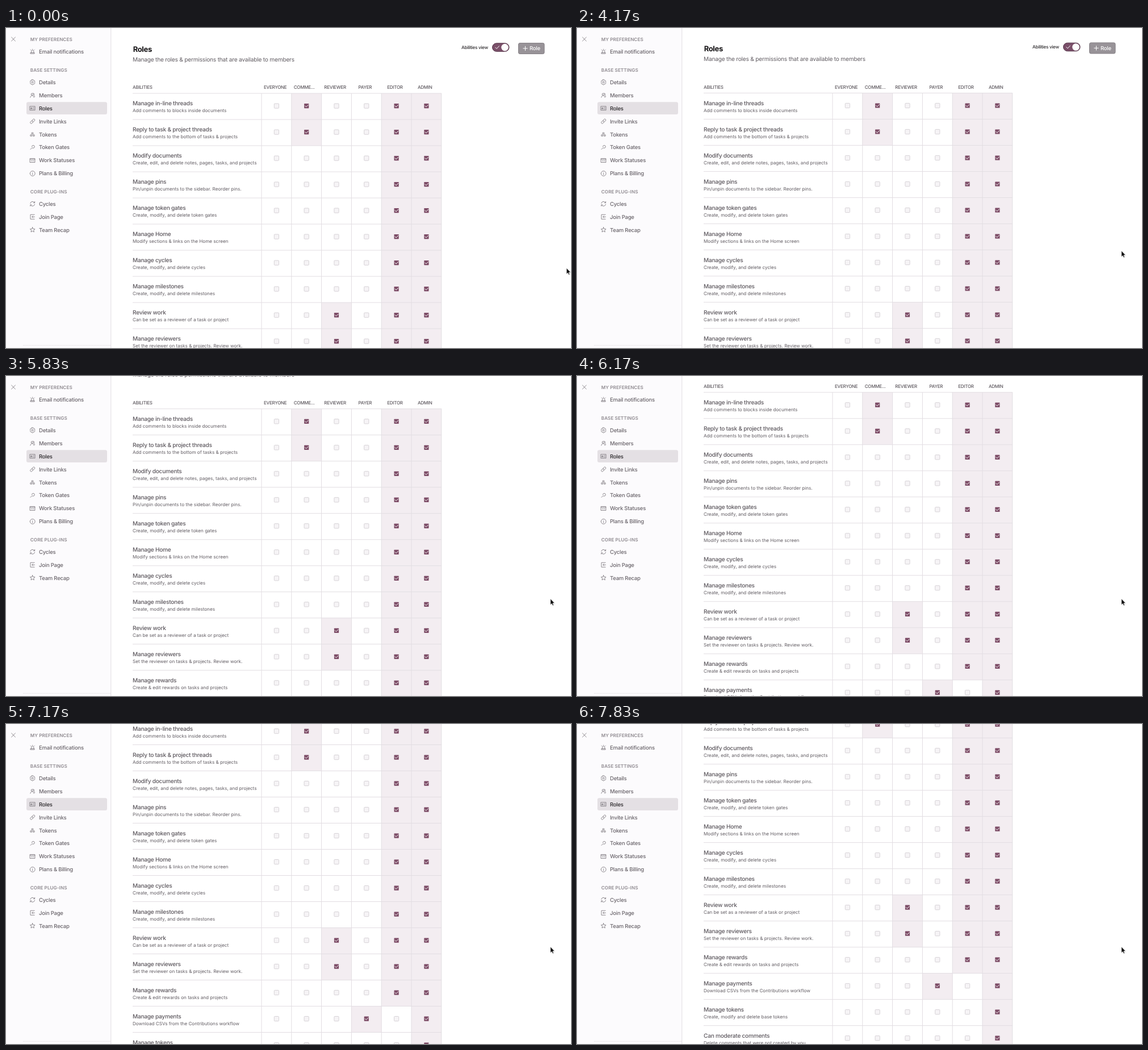
An HTML page for the animation above (8000 ms loop, 995x563 px).

```html
<!DOCTYPE html>
<html lang="en">
<head>
<meta charset="utf-8">
<title>Roles settings</title>
<style>
  html, body { margin: 0; width: 100%; height: 100%; overflow: hidden; background: #fff; }
  svg { display: block; width: 995px; height: 563px; }
  text { font-family: Inter, sans-serif; text-rendering: geometricPrecision; }
  .title { font-size: 13.1px; font-weight: 700; fill: #161416; letter-spacing: -.03em; }
  .intro { font-size: 10.15px; fill: #625d63; letter-spacing: -.02em; }
  .name { font-size: 10.1px; font-weight: 550; fill: #5d585e; letter-spacing: -.024em; }
  .note { font-size: 8.14px; fill: #625d63; }
  .col { font-size: 8px; font-weight: 550; fill: #5d585e; letter-spacing: -.034em; }
  .view { font-size: 8.05px; font-weight: 500; fill: #302d30; letter-spacing: -.034em; }
  .item { font-size: 9.5px; font-weight: 550; fill: #6a656b; letter-spacing: -.024em; }
  .active { fill: #2b282b; }
  .button { fill: #fff; }
  .group { font-size: 8.1px; font-weight: 600; fill: #8e898f; letter-spacing: .01em; }
  .mid { text-anchor: middle; }
  .line { stroke: #e2dde2; }
  .icon { fill: none; stroke: #7b767c; stroke-width: .85; stroke-linejoin: round; stroke-linecap: round; }
  .tick { fill: none; stroke: #fff; stroke-width: 1; stroke-linecap: round; stroke-linejoin: round; }
</style>
</head>
<body>
<svg viewBox="0 0 995 563">
  <g id="page"></g>
  <g id="sidebar"></g>
  <path id="cursor" d="M0 0V10.5L2.4 8.3 4 11.9 5.7 11.2 4.2 7.6H7.4z" fill="#111" stroke="#fff" stroke-width=".6"/>
</svg>
<script>
const get = id => document.getElementById(id);
const text = (x, y, cls, s) => `<text x="${x}" y="${y}" class="${cls}">${s}</text>`;
const rect = (x, y, w, h, r, fill, more = '') =>
  `<rect x="${x}" y="${y}" width="${w}" height="${h}" rx="${r}" fill="${fill}" ${more}/>`;
const line = (x1, y1, x2, y2) => `<path class="line" d="M${x1} ${y1}L${x2} ${y2}"/>`;

const columns = ['EVERYONE', 'COMME...\u00a0\u00a0', 'REVIEWER', 'PAYER', 'EDITOR', 'ADMIN'];
// Each ability: name, description, indexes of the roles that have it.
const abilities = [
  ['Manage in-line threads', 'Add comments to blocks inside documents', '145'],
  ['Reply to task & project threads', 'Add comments to the bottom of tasks & projects', '145'],
  ['Modify documents', 'Create, edit, and delete notes, pages, tasks, and projects', '45'],
  ['Manage pins', 'Pin/unpin documents to the sidebar. Reorder pins.', '45'],
  ['Manage token gates', 'Create, modify, and delete token gates', '45'],
  ['Manage Home', 'Modify sections & links on the Home screen', '45'],
  ['Manage cycles', 'Create, modify, and delete cycles', '45'],
  ['Manage milestones', 'Create, modify, and delete milestones', '45'],
  ['Review work', 'Can be set as a reviewer of a task or project', '245'],
  ['Manage reviewers', 'Set the reviewer on tasks & projects. Review work.', '245'],
  ['Manage rewards', 'Create & edit rewards on tasks and projects', '45'],
  ['Manage payments', 'Download CSVs from the Contributions workflow', '35'],
  ['Manage tokens', 'Create, modify and delete base tokens', '5'],
  ['Can moderate comments', 'Delete comments that were not created by you', '5'],
];
const LEFT = 450, TOP = 115, COL = 52.8, ROW = 46;

function checkbox(x, y, on) {
  return on
    ? rect(x - 4.1, y - 4, 8.2, 8.2, .6, '#7d4d67') + `<path class="tick" d="M${x - 2.6} ${y}l2 2 3.8-3.8"/>`
    : rect(x - 4.1, y - 4, 8.2, 8.2, 1, '#f6f4f6', 'stroke="#d3cfd3" stroke-width=".9"');
}

function buildPage() {
  let out = text(223.7, 42, 'title', 'Roles')
    + text(223, 58.6, 'intro', 'Manage the roles & permissions that are available to members')
    + text(802, 37, 'view', 'Abilities view')
    + rect(856.5, 26.8, 29.5, 14.5, 7.25, '#7a4f69', 'stroke="#57374b"')
    + '<circle cx="878.5" cy="34.1" r="6.3" fill="#fff"/><path class="tick" d="M861.8 34.2l2.3 2.3 4.3-4.8"/>'
    + rect(902.5, 26.5, 45.5, 19, 2.5, '#989398', 'stroke="#858085"')
    + '<path class="tick" d="M914.5 32.2v7.4M910.8 35.9h7.4"/>'
    + text(922, 39.4, 'item button', 'Role')
    + text(223, 107.4, 'col', 'ABILITIES');
  columns.forEach((name, i) => out += text(474.2 + i * 52.7, 107.4, 'col mid', name));
  let grid = line(223, TOP, 767, TOP);
  abilities.forEach(([name, note, roles], r) => {
    const y = TOP + r * ROW;
    out += text(223, y + 21.4, 'name', name) + text(223, y + 33.3, 'note', note);
    columns.forEach((_, c) => {
      const x = LEFT + c * COL, on = roles.includes(c);
      if (on) out += rect(x, y, COL, ROW, 0, '#f3edf1');
      grid += checkbox(x + COL / 2, y + 22, on);
    });
    grid += line(223, y + ROW, 767, y + ROW);
  });
  for (let c = 0; c <= 6; c++) grid += line(LEFT + c * COL, TOP, LEFT + c * COL, TOP + ROW * abilities.length);
  return out + grid;
}

const starPoints = Array.from({ length: 10 }, (_, i) => {
  const r = i % 2 ? 2.1 : 4.6, a = i * Math.PI / 5;
  return `${r * Math.sin(a)} ${-r * Math.cos(a)}`;
});
// Icons are drawn around their own centre.
const icons = {
  alarm: 'M-3.4 3.8H3.4V2.2H-3.4zM-2.2 2V-.3a2.2 2.2 0 0 1 4.4 0V2M0-4v-.2M-3.2-2.8l-.4-.4M3.2-2.8l.4-.4',
  gear: 'M-1-4.5H1L1.5-3.2 3-3.2 4.2-1.2 3.5 0 4.2 1.2 3 3.2 1.5 3.2 1 4.5H-1L-1.5 3.2-3 3.2-4.2 1.2-3.5 0-4.2-1.2-3-3.2-1.5-3.2zM-1.5 0a1.5 1.5 0 1 0 3 0a1.5 1.5 0 1 0-3 0',
  people: 'M-2.4-1.6a1.8 1.8 0 1 0 3.6 0a1.8 1.8 0 1 0-3.6 0M-3.8 3.9C-3.6 1.4-2.2.6-.6.6S2.2 1.6 2.4 3.9M1.4-3.5a1.8 1.8 0 0 1 .8 3.3Q3.7.8 3.8 2.8',
  card: 'M-4.4-3.4H4.4V3.4H-4.4zM-2.8 1.6V-.4a.9 .9 0 1 1 1.8 0V1.6M-2.8.5H-1M1-1.2H2.8M1 1.3H2.8',
  link: 'M-.8-1.8L.9-3.5a1.8 1.8 0 0 1 2.6 2.6L1.8.8Q.5 1.8-.8.8M.8 1.8L-.9 3.5a1.8 1.8 0 0 1-2.6-2.6L-1.8-.8Q-.5-1.8.8-.8',
  tokens: 'M-1.1-3H1.1V-.6H-1.1zM-3.4.8H-1.2V3.1H-3.4zM1.2.8H3.4V3.1H1.2z',
  key: 'M-1.2-1.2a2.4 2.4 0 1 1 2.4 2.4Q-.2 1.2-.8.6L-3.6 3.4',
  board: 'M-4.2-3.4H4.2V3.5H-4.2zM-4.2-1.8H4.2M-2.3.8H-.7M.8.8H2.3',
  info: 'M-4.4 0a4.4 4.4 0 1 0 8.8 0a4.4 4.4 0 1 0-8.8 0M0-.4V2.2M0-2.2v.1',
  cycle: 'M-3.9-.8A4 4 0 0 1 3.5-2M3.9-4V-1.7H1.7M3.9.8A4 4 0 0 1-3.5 2M-3.9 4V1.7H-1.7',
  join: 'M3.5-4H-3.7V4H3.5M3.8 0H-.8M.8-1.7L-.9 0 .8 1.7',
  star: `M${starPoints.join('L')}z`,
};

const menu = [
  ['MY PREFERENCES', 20, [['alarm', 'Email notifications']]],
  ['BASE SETTINGS', 74, [['gear', 'Details'], ['people', 'Members'], ['card', 'Roles'], ['link', 'Invite Links'],
    ['tokens', 'Tokens'], ['key', 'Token Gates'], ['board', 'Work Statuses'], ['info', 'Plans &amp; Billing']]],
  ['CORE PLUG-INS', 288, [['cycle', 'Cycles'], ['join', 'Join Page'], ['star', 'Team Recap']]],
];

function buildSidebar() {
  let out = rect(0, 0, 185, 563, 0, '#fcfbfd') + line(184.8, 0, 184.8, 563)
    + '<path class="line" stroke-dasharray="1.5 1" d="M30 558.3H184"/>'
    + '<path class="icon" d="M9.6 16.2l6.8 6.8M16.4 16.2l-6.8 6.8"/>'
    + rect(36, 130.3, 142, 21.6, 3, '#e4e0e4');
  for (const [group, y, items] of menu) {
    out += text(42.8, y + 2.9, 'group', group);
    items.forEach(([icon, label], i) => {
      const cy = y + 21.3 + i * 22.95;
      out += `<path class="icon" transform="translate(46.7 ${cy})" d="${icons[icon]}"/>`
        + text(58, cy + 3.4, label === 'Roles' ? 'item active' : 'item', label);
    });
  }
  return out;
}

const FRAME = 1000 / 6;
const progress = (t, start, length) => Math.min(1, Math.max(0, (t - start) / length));
const smooth = p => p * p * (3 - 2 * p);
// Three scroll gestures: start, length, distance.
const gestures = [[4100, 1067, 52.2], [5667, 1000, 68.1], [7015, 1000, 68]];

function draw(now) {
  const t = Math.floor((now % 8000 + 4) / FRAME) * FRAME;
  const scroll = gestures.reduce((sum, [start, length, by]) => sum + by * smooth(progress(t, start, length)), 0);
  get('page').setAttribute('transform', `translate(0 ${-scroll})`);
  const rest = (1 - progress(t, 2500, 833)) ** 2;
  const [x, y] = t < FRAME ? [987.1, 422.4] : [958.8 + 41 * rest, 392.1 + 4 * rest];
  get('cursor').setAttribute('transform', `translate(${x} ${y})`);
  requestAnimationFrame(() => draw(performance.now()));
}

get('page').innerHTML = buildPage();
get('sidebar').innerHTML = buildSidebar();
draw(0);
</script>
</body>
</html>
```
